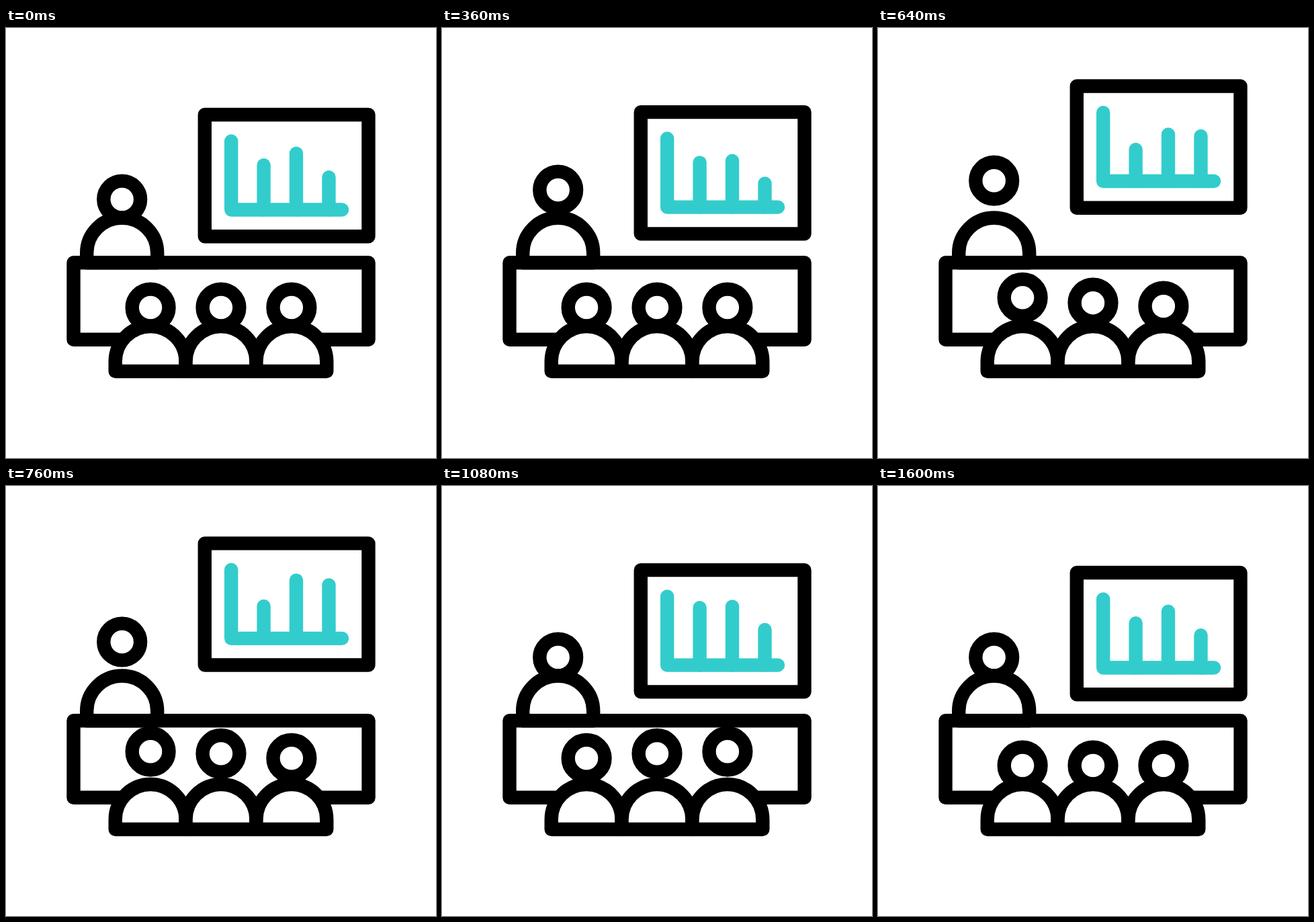
An HTML page for the animation above (1760 ms loop, 640 by 640 pixels).

```html
<!DOCTYPE html>
<html lang="en">
<head>
<meta charset="utf-8">
<title>Presentation</title>
<style>
  html, body { margin: 0; width: 100%; height: 100%; overflow: hidden; background: #fff; }
  svg { display: block; width: 100vw; height: 100vh; }
  .ink { fill: none; stroke: #000; stroke-width: 20.4; stroke-linejoin: round; }
  .teal { fill: none; stroke: #33cccc; stroke-width: 20.4; stroke-linejoin: round; stroke-linecap: round; }
  .body { fill: #fff; }
</style>
</head>
<body>
<svg viewBox="0 0 640 640">
  <g id="screen">
    <rect class="ink" x="295.8" y="129" width="243.7" height="181.2"/>
    <path class="teal" d="M335.2 168.4V270.5H500"/>
    <path class="teal" id="bar0"/>
    <path class="teal" id="bar1"/>
    <path class="teal" id="bar2"/>
  </g>
  <path class="ink body" d="M120.2 349.3V335a52.5 52.5 0 0 1 105 0V349.3Z"/>
  <path class="ink" d="M180 463.7H100.5V349.2H539.6V463.7H460"/>
  <g id="audience"></g>
  <circle class="ink" id="speaker" cx="172.7" cy="255" r="27.4"/>
</svg>
<script>
const LOOP = 1760, STEP = 40, HOP = 480, BASE = 270.5;
const $ = id => document.getElementById(id);

// Three listeners, side by side
$('audience').innerHTML = [215.1, 320, 424.9].map((x, i) =>
  `<path class="ink body" d="M${x - 52.4} 511V496.4a52.4 52.4 0 0 1 104.8 0V511Z"/>` +
  `<circle class="ink" id="head${i}" cx="${x}" cy="416" r="27.4"/>`).join('');

// Parts that rise and fall: id, height, time of the peak
const hops = [
  ['speaker', 28, 600],
  ['screen', 44, 720],
  ['head0', 21.5, 840],
  ['head1', 21.5, 920],
  ['head2', 21.5, 1000]
];

// Chart bars: x, then [time, height] keys
const bars = [
  [383.6, [[450, 76.5], [680, 56.6], [1160, 97], [1600, 76.5]]],
  [432, [[200, 94], [480, 71.5], [880, 100.7], [1280, 94]]],
  [480.5, [[120, 58.5], [400, 45], [800, 90], [1200, 58.5]]]
];

// Symmetric cubic-bezier(.57, 0, .43, 1)
function ease(x) {
  if (x <= 0) return 0;
  if (x >= 1) return 1;
  let lo = 0, hi = 1, s;
  for (let i = 0; i < 24; i++) {
    s = (lo + hi) / 2;
    const r = 1 - s;
    if (1.71 * s * r * r + 1.29 * s * s * r + s * s * s < x) lo = s; else hi = s;
  }
  return s * s * (3 - 2 * s);
}

function valueAt(keys, t) {
  let v = keys[0][1];
  for (let i = 1; i < keys.length; i++) {
    const [t0, v0] = keys[i - 1], [t1, v1] = keys[i];
    if (t > t0) v = v0 + (v1 - v0) * ease((t - t0) / (t1 - t0));
  }
  return v;
}

function draw(t) {
  for (const [id, height, peak] of hops) {
    const y = -height * ease(1 - Math.abs(t - peak) / HOP);
    $(id).setAttribute('transform', `translate(0 ${y.toFixed(2)})`);
  }
  bars.forEach(([x, keys], i) => {
    const top = BASE + 10.2 - valueAt(keys, t);
    $('bar' + i).setAttribute('d', `M${x} ${BASE}V${top.toFixed(2)}`);
  });
}

const start = performance.now();
function tick() {
  const t = (performance.now() - start) % LOOP;
  draw(Math.floor(t / STEP) * STEP);
  requestAnimationFrame(tick);
}
tick();
</script>
</body>
</html>
```
